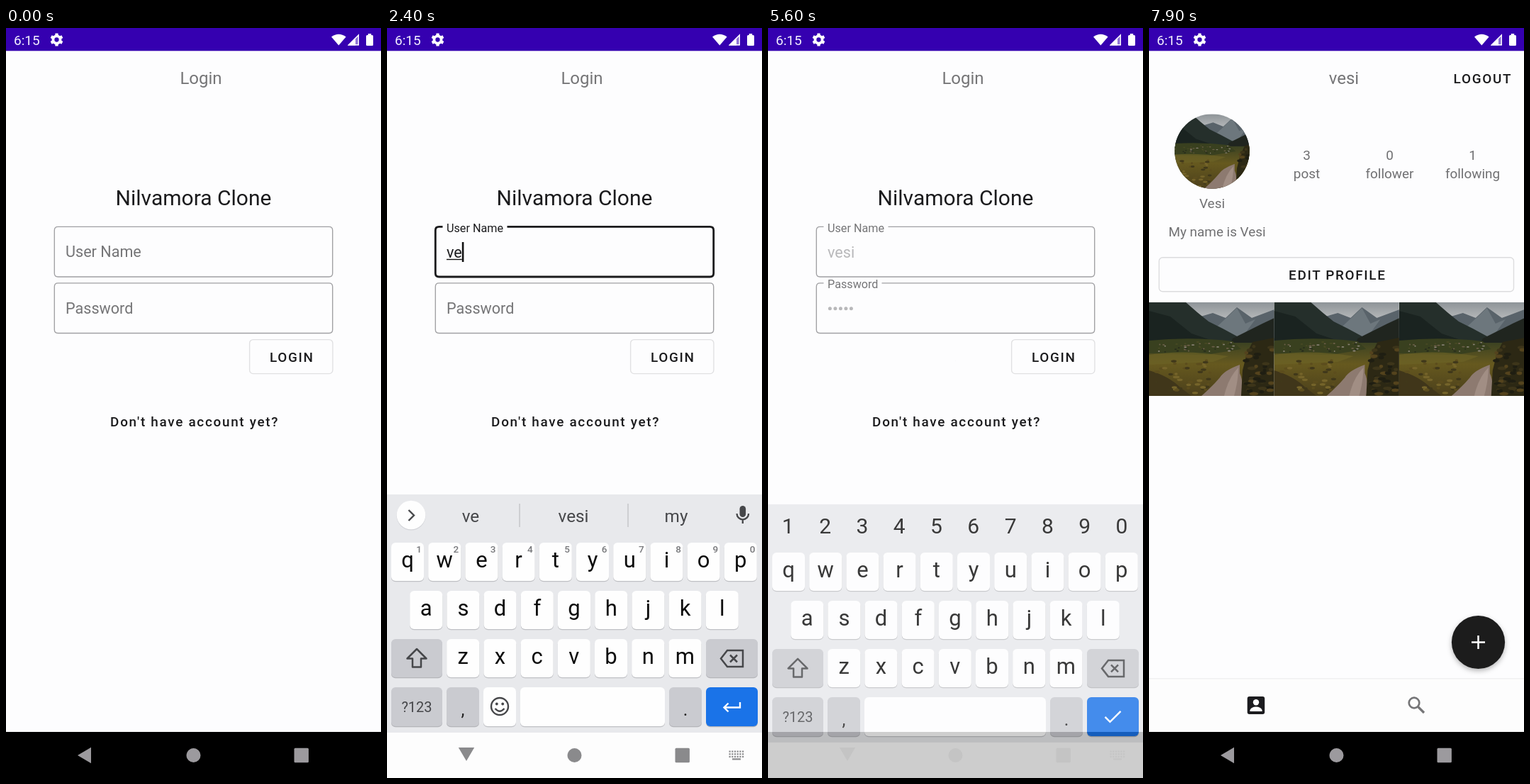
An HTML page that plays this animation: 529 px wide and 1058 px high, repeating every 8 s.

```html
<!DOCTYPE html>
<html lang="en">
<head>
<meta charset="utf-8">
<title>Login flow</title>
<style>
html, body { margin: 0; width: 100%; height: 100%; overflow: hidden; background: #fdfdfe; }
svg { display: block; width: 100%; height: 100%; }
text { font-family: Roboto, "Noto Sans", sans-serif; }
.btn { font-size: 18.9px; font-weight: 500; letter-spacing: 1.69px; fill: #1b1b1d; }
.body { font-size: 18.9px; fill: #707072; }
.title { font-size: 24px; fill: #757577; }
.field { font-size: 21.6px; }
.key { font-size: 31px; fill: #0c0c0c; }
.hint { font-size: 13.5px; font-weight: 500; fill: #77787b; }
.word { font-size: 24.3px; fill: #46474a; }
.mid { text-anchor: middle; }
</style>
</head>
<body>
<svg id="stage" viewBox="0 0 529 1058"></svg>
<script>
const LOOP = 8000;
const NAME = 'vesi', FULL = 'Vesi';
const NAME_KEYS = [2200, 2300, 2700, 2900];
const PASS_KEYS = [4300, 4550, 4800, 5050, 5300];
const T = {
  user: 1250, kbIn: 1400, pass: 3500, submit: 5560,
  profile: 6600, refresh: 7024, loaded: 7500, photos: 7550
};

const clamp = v => Math.max(0, Math.min(1, v));
const part = (t, start, dur) => clamp((t - start) / dur);
const mix = (a, b, p) => a + (b - a) * p;
const rep = (n, fn) => Array.from({ length: n }, (_, i) => fn(i)).join('');

// Markup helpers
const rect = (x, y, w, h, fill, r = 0, more = '') =>
  `<rect x="${x}" y="${y}" width="${w}" height="${h}" rx="${r}" fill="${fill}" ${more}/>`;
const circle = (x, y, r, fill, more = '') =>
  `<circle cx="${x}" cy="${y}" r="${r}" fill="${fill}" ${more}/>`;
const path = (d, fill, more = '') => `<path d="${d}" fill="${fill}" ${more}/>`;
const line = (d, color, w, more = '') =>
  path(d, 'none', `stroke="${color}" stroke-width="${w}" ${more}`);
const text = (x, y, s, cls, more = '') => `<text x="${x}" y="${y}" class="${cls}" ${more}>${s}</text>`;
const group = (id, inner, more = '') => `<g id="${id}" ${more}>${inner}</g>`;
const btnText = (cx, y, s) => text(cx + .85, y, s, 'btn mid');

const gear = (x, y, r, color) =>
  `<g transform="translate(${x} ${y}) scale(${r})">` +
  circle(0, 0, .56, 'none', `stroke="${color}" stroke-width=".42"`) +
  rep(6, i => rect(-.24, -1, .48, .4, color, .06, `transform="rotate(${i * 60})"`)) + '</g>';

const mic = (color) =>
  rect(497.5, 674, 8.6, 16, color, 4.3) +
  line('M493.5 685a8.3 8.3 0 0 0 16.6 0M501.8 693v6', color, 2.3);

// Flat landscape in a 176.4 x 132 box
function photo() {
  let seed = 7;
  const rnd = () => (seed = seed * 16807 % 2147483647) / 2147483647;
  const specks = (n, x, y, w, h, r, colors) => rep(n, i =>
    `<ellipse cx="${(x + rnd() * w).toFixed(1)}" cy="${(y + rnd() * h).toFixed(1)}" ` +
    `rx="${(r * (.6 + rnd())).toFixed(1)}" ry="${(r * .6).toFixed(1)}" fill="${colors[i % colors.length]}"/>`);
  return rect(0, 0, 176.4, 132, 'url(#sky)') +
    path('M66 22L90 15 108 22 124 7 145 22 177 10V62H60z', '#59636a') +
    path('M92 38L124 8 136 30 150 24 128 54H100z', '#6d777d') +
    path('M0 0H52L68 14 84 27 104 37 128 50V64H0z', '#252f2b') +
    path('M0 12L30 20 60 44 90 54H0z', '#1a2320') +
    path('M177 22L160 30 140 40 118 51 112 66H177z', '#20251f') +
    rect(0, 57, 176.4, 75, 'url(#grass)') +
    path('M0 54Q60 48 118 55L130 66 80 74 0 72z', '#39401f') +
    specks(44, 14, 56, 112, 14, 1.5, ['#8b8478', '#262b1b', '#6d5f49', '#494a24']) +
    path('M0 74Q50 66 112 76L90 84 0 88z', '#6d6325', 'opacity=".7"') +
    path('M128 88Q106 96 100 106 90 118 74 132H130Q134 112 128 100z', '#8d7a70') +
    path('M126 92Q112 106 106 132H120Q126 110 126 92z', '#a18e84') +
    path('M177 50L146 56 138 72 132 96 130 132H177z', '#2c2814') +
    path('M0 96Q28 104 44 120L60 132H0z', '#40361a') +
    specks(40, 136, 62, 38, 68, 4, ['#3d351a', '#1f1e12', '#54431d']) +
    specks(40, 0, 82, 88, 48, 3, ['#5c4d1d', '#40381a', '#75642a']);
}

function fieldMarkup(id, label, dy) {
  return line('', '#a0a0a3', 1.35, `id="${id}Box"`) +
    text(84, 323 + dy, label, 'field', `id="${id}Label"`) +
    text(84, 324 + dy, '', 'field', `id="${id}Value"`) +
    rect(84, 302 + dy, 2.6, 28, '#111', 0, `id="${id}Cursor"`);
}

function key(x, y, w, label, h = 54) {
  return rect(x, y + 1.3, w, h, '#bfc0c4', 6) + rect(x, y, w, h, '#fefefe', 6) +
    text(x + w / 2, y + 35, label, 'key mid');
}
const modKey = (x, y, w, fill = '#cacbd0', h = 54) =>
  rect(x, y + 1.3, w, h, '#b4b5b9', 6) + rect(x, y, w, h, fill, 6);

function keyboardMarkup() {
  const row = (letters, x, y) => rep(letters.length, i => key(x + 52.2 * i, y, 46, letters[i]));
  const ink = '#46474a', soft = '#77787b';
  const space = (x) => key(x, 930, 392 - x, '', 55);
  const sep = x => line(`M${x} 671V704`, '#c3c4c8', 1.4);
  const chevron = d => circle(34, 688, 20.5, '#d3d4d8') + circle(34, 687, 20.3, '#fefefe') +
    line(d, ink, 2.4);
  const toolbar = chevron('M38 680l-7.5 7.5 7.5 7.5') +
    line('M94 677h18v14l-6 6H94zM112 690h-7v7M98 688q4 5 9 1', soft, 2.4, 'stroke-linejoin="round"') +
    circle(99, 683, 1.6, soft) + circle(107, 683, 1.6, soft) +
    text(178.5, 693.5, 'GIF', 'mid', `font-size="18" font-weight="900" letter-spacing="1" fill="${soft}"`) +
    line('M246.500 677h19v21h-19zM250.500 684h11M250.500 689h11M250.500 694h7', soft, 2.3) +
    rect(251, 674, 10, 6, soft, 2) +
    gear(332, 688, 12, soft) + sep(378) + rep(3, i => circle(417.500 + i * 8.5, 687, 2.8, soft)) + mic(soft);
  const words = chevron('M30.500 680l7.500 7.500-7.500 7.500') + sep(187) + sep(340) +
    text(118, 697, '', 'word mid', 'id="prefix"') + text(263, 697, NAME, 'word mid') +
    text(408, 697, 'my', 'word mid') + mic(ink);
  const plain = rep(10, i => text(136 * 0 + 36 + 50, 0, '', 'hint')) && '';
  return rect(0, 658, 529, 400, '#e8e9ec') + rect(0, 994, 529, 64, '#fdfdfd') +
    row('qwertyuiop', 6, 726) + row('asdfghjkl', 32.2, 794) + row('zxcvbnm', 84.2, 862) +
    modKey(6, 862, 72) + line('M42 876L28.500 889.500h7.500v12h12v-12h7.500z', ink, 2.5, 'stroke-linejoin="round"') +
    modKey(450, 862, 73) + line('M480 878h22v23h-22l-9-11.500zM484 884.500l10 10M494 884.500l-10 10', ink, 2.5) +
    modKey(6, 930, 72, '#cacbd0', 55) + text(42, 965, '?123', 'mid', `font-size="20" fill="${ink}"`) +
    modKey(84, 930, 46, '#cacbd0', 55) + text(107, 970, ',', 'mid', 'font-size="25" fill="#222"') +
    modKey(398, 930, 46, '#cacbd0', 55) + text(421, 970, '.', 'mid', 'font-size="25" fill="#222"') +
    modKey(450, 930, 73, '#1a73e8', 55) + plain +
    group('textKeys',
      rep(10, i => text(45 + 52.3 * i, 740, (i + 1) % 10, 'hint mid')) +
      key(136, 930, 46, '', 55) + space(188) +
      circle(159, 957, 12, 'none', `stroke="${ink}" stroke-width="2.4"`) +
      circle(154.800, 953.500, 1.9, ink) + circle(163.200, 953.500, 1.9, ink) +
      line('M152.500 960q6.500 7.500 13 0', ink, 2.3) +
      line('M498 951v7.500h-22M481.500 952.500l-6 6 6 6', '#fff', 2.4) +
      group('toolbar', toolbar) + group('words', words)) +
    group('passKeys',
      rep(10, i => text(28.3 + 52.3 * i, 699, (i + 1) % 10, 'key mid', 'style="font-size:30px"')) +
      space(136) + line('M475.500 958l7 7 15-15', '#fff', 2.4));
}

const stops = (...list) => list.map(([o, c]) => `<stop offset="${o}" stop-color="${c}"/>`).join('');
const stats = [[222.5, 3, 'post'], [339.5, 0, 'follower'], [456.5, 1, 'following']];

document.getElementById('stage').innerHTML =
  `<defs>
    <linearGradient id="sky" x2="0" y2="1">${stops([0, '#8e9498'], [.15, '#b0b3b5'], [.4, '#737c82'])}</linearGradient>
    <linearGradient id="grass" x2="0" y2="1">${stops([0, '#3c4222'], [.4, '#66591f'], [1, '#4b3f1b'])}</linearGradient>
    <linearGradient id="shine" gradientUnits="userSpaceOnUse" x1="-132" x2="132" y1="0" y2="0">
      ${stops([0, '#f1f1f1'], [.5, '#d7d7d8'], [1, '#f1f1f1'])}</linearGradient>
    <filter id="shadow" x="-40%" y="-40%" width="180%" height="180%">
      <feDropShadow dx="0" dy="3" stdDeviation="3.5" flood-opacity=".28"/></filter>
    <clipPath id="face"><circle cx="89" cy="174" r="52.700"/></clipPath>
    <clipPath id="frame"><rect width="176.400" height="132"/></clipPath>
    <g id="photo" clip-path="url(#frame)">${photo()}</g>
  </defs>` +
  rect(0, 0, 529, 1058, '#fdfdfe') +
  group('login',
    text(275, 79, 'Login', 'title mid') +
    text(264.5, 250, 'Nilvamora Clone', 'mid', 'font-size="30" fill="#1b1b1d"') +
    fieldMarkup('user', 'User Name', 0) + line('', '#111', 1.4, 'id="compose"') +
    fieldMarkup('pass', 'Password', 79.5) + group('bullets', '') +
    rect(343.6, 439.600, 117.300, 48, 'none', 5, 'stroke="#e0e0e2" stroke-width="1.35"') +
    btnText(402.5, 470.500, 'LOGIN') + btnText(265.3, 562, "Don't have account yet?") +
    group('dots', rep(12, i => {
      const a = i * Math.PI / 6;
      return circle(264.5 + 43.7 * Math.sin(a), 513 - 43.7 * Math.cos(a), 0, '#1b1b1d');
    }))) +
  group('profile',
    text(275, 79, NAME, 'title mid') + btnText(470, 77.500, 'LOGOUT') +
    group('skeleton',
      circle(89, 174, 52.7, 'url(#shine)') + rect(164, 164.500, 351, 52, 'url(#shine)') +
      rect(13.500, 233.500, 150.500, 26, 'url(#shine)') + rect(27, 273, 474, 35.500, 'url(#shine)') +
      rect(13.500, 323, 501.500, 50, 'url(#shine)', 3)) +
    group('details',
      stats.map(([x, n, s]) => text(x, 185.5, n, 'body mid') + text(x, 211.5, s, 'body mid')).join('') +
      text(89, 254, FULL, 'body mid') + text(27.5, 294, 'My name is ' + FULL, 'body') +
      rect(14.200, 323.700, 500.300, 48, 'none', 5, 'stroke="#dcdcde" stroke-width="1.35"') +
      btnText(265, 355, 'EDIT PROFILE') +
      group('photos',
        `<g clip-path="url(#face)"><use href="#photo" transform="translate(18.400 121.300) scale(.8)"/></g>` +
        rep(3, i => `<use href="#photo" x="${i * 176.4}" y="387"/>`))) +
    rect(0, 918, 529, 76, '#fdfdfd') + line('M0 917.700H529', '#f0f0f1', 1.4) +
    rect(138.700, 943, 24.500, 25, '#1c1c1f', 3) + circle(151, 951.300, 4.2, '#fff') +
    path('M142.500 964v-2q2-4.500 8.500-4.500t8.500 4.500v2z', '#fff') +
    circle(374, 952, 7.3, 'none', 'stroke="#757577" stroke-width="2.700"') +
    line('M379 957l9 9', '#757577', 3.2) +
    group('fab', circle(0, 0, 37.6, '#1e1e1f', 'filter="url(#shadow)"') +
      line('M-9.500 0H9.500M0-9.500V9.500', '#fff', 2.5)) +
    group('refresh', circle(0, 0, 27.3, '#fbfbfb', 'filter="url(#shadow)"') +
      line('', '#111', 3.6, 'id="arc"'))) +
  rect(0, 993, 529, 65, '#000') + group('kb', keyboardMarkup()) +
  group('nav',
    path('M101 1026L120 1014.800V1037.200z', 'currentColor', 'id="back"') +
    path('M100.800 1015H123.200L112 1034z', 'currentColor', 'id="down"') +
    circle(264.5, 1026, 10, 'currentColor') + rect(406.500, 1015.800, 20.400, 20.400, 'currentColor', 1.5) +
    group('ime', rep(18, i => rect(482.5 + (i % 6) * 3.7, 1019.5 + Math.floor(i / 6) * 3.7, 2.2, 2.2, 'currentColor')) +
      rect(487, 1030.300, 12, 2.2, 'currentColor'))) +
  rect(0, 0, 529, 32.300, '#3500b0') +
  text(11, 23.5, '6:15', '', 'font-size="19" fill="#f4f0ff"') + gear(71.5, 16.5, 9, '#fff') +
  path('M459 12.500Q469.300 5 479.600 12.500L469.300 24.500z', '#fff') +
  path('M482 24.500L498 8.500V24.500z', '#8f74d6') + path('M482 24.500L493 13.500V24.500z', '#fff') +
  line('M483.500 23.800H497.300V10z', '#fff', 1.4) +
  rect(508, 10, 10, 15, '#fff', 1.5) + rect(510.800, 8, 4.400, 3, '#fff');

const el = {};
document.querySelectorAll('[id]').forEach(n => el[n.id] = n);
const set = (id, attrs) => { for (const k in attrs) el[id].setAttribute(k, attrs[k]); };
const show = (id, on) => { el[id].style.display = on ? '' : 'none'; };
const say = (id, s) => { if (el[id].textContent !== s) el[id].textContent = s; };

function drawField(id, dy, labelW, t, focusAt, blurAt, lastKey, endX) {
  const focused = t >= focusAt && t < blurAt;
  const p = 1 - (1 - part(t, focusAt, 167)) ** 2;
  const l = 68.3, r = 460.7, y = 280.4 + dy, b = 351 + dy, c = 5;
  const gap = 5.5 + labelW / 2, mid = 84 + labelW / 2;
  const from = mix(mid, mid - gap, p), to = mix(mid, mid + gap, p);
  set(id + 'Box', {
    d: `M${to} ${y}H${r - c}q${c} 0 ${c} ${c}V${b - c}q0 ${c} ${-c} ${c}H${l + c}q${-c} 0 ${-c} ${-c}V${y + c}q0 ${-c} ${c} ${-c}H${from}`,
    stroke: focused ? '#1b1b1d' : '#a0a0a3', 'stroke-width': focused ? 2.8 : 1.35
  });
  set(id + 'Label', { y: mix(323, 287.8, p) + dy, fill: focused ? '#1b1b1d' : '#757577' });
  el[id + 'Label'].style.fontSize = mix(21.6, 16.2, p) + 'px';
  set(id + 'Value', { fill: t < T.submit ? '#1b1b1d' : '#b8b8ba' });
  set(id + 'Cursor', { x: endX });
  show(id + 'Cursor', focused && (t - lastKey) % 1000 < 500);
}

function drawLogin(t) {
  const typed = NAME_KEYS.filter(k => t >= k);
  say('userValue', NAME.slice(0, typed.length));
  const width = typed.length ? el.userValue.getComputedTextLength() : 0;
  drawField('user', 0, 80, t, T.user, T.pass, typed.at(-1) || T.user, 84 + width);
  set('compose', { d: `M84 326.500h${width}` });
  show('compose', width && t < T.pass);
  say('prefix', NAME.slice(0, typed.length));
  show('toolbar', !typed.length);
  show('words', typed.length);

  const keys = PASS_KEYS.filter(k => t >= k);
  const n = keys.length, open = n && t < T.submit ? 1 : 0;
  const x = 84 + 7.5 * (n - open);
  say('passValue', open ? String(n) : '');
  set('passValue', { x });
  el.bullets.innerHTML = rep(n - open, i =>
    circle(87.4 + 7.5 * i, 395.8, 2.5, t < T.submit ? '#1b1b1d' : '#b8b8ba'));
  drawField('pass', 79.5, 71, t, T.pass, T.submit, keys.at(-1) || T.pass, x + open * 12);

  [...el.dots.children].forEach((dot, i) => {
    const age = t - T.submit - i * 100;
    dot.setAttribute('r', age < 0 ? 0 : 7.5 * Math.sin(Math.PI * age / 1200) ** 2);
  });
}

function drawKeyboard(t) {
  const hide = part(t, T.submit, 220);
  const up = t >= T.kbIn && hide < 1;
  const alpha = Math.min(part(t, T.kbIn, 180), 1 - hide);
  const drop = 400 * ((1 - part(t, T.kbIn, 350)) ** 2.54 + hide ** 2);
  show('kb', up);
  set('kb', { transform: `translate(0 ${drop})`, opacity: alpha });
  show('textKeys', t < T.pass);
  show('passKeys', t >= T.pass);
  show('back', !up);
  show('down', up);
  set('ime', { opacity: up ? alpha : 0 });
  el.nav.style.color = !up ? '#9c9a9e' : alpha < 1 ? '#c4c4c4' : '#8a8a8c';
}

function drawProfile(t) {
  show('skeleton', t < T.loaded);
  show('details', t >= T.loaded);
  const shift = -264.5 + 1.058 * ((t - T.profile) % 1000);
  set('shine', { gradientTransform: `translate(${shift} 250) rotate(22)` });
  set('photos', { opacity: part(t, T.photos, 200) });

  const grow = part(t, T.loaded, 200);
  set('fab', { transform: `translate(464.500 866.500) scale(${1 - (1 - grow) ** 2})` });
  show('fab', grow > 0);

  const fall = 1 - (1 - part(t, T.refresh, 200)) ** 2;
  const scale = 1 - part(t, T.loaded, 150);
  show('refresh', t >= T.refresh && scale > 0);
  set('refresh', { transform: `translate(264.500 ${mix(5, 145, fall)}) scale(${scale})` });
  const age = t - T.refresh, q = part(age, 60, 640);
  const a = (6 + age * .05) * Math.PI / 180;
  const e = a + (22 + 265 * q * q * (3 - 2 * q)) * Math.PI / 180;
  const at = v => `${11.3 * Math.cos(v)} ${11.3 * Math.sin(v)}`;
  set('arc', { d: `M${at(a)}A11.300 11.300 0 ${e - a > Math.PI ? 1 : 0} 1 ${at(e)}` });
}

function frame() {
  const t = performance.now() % LOOP;
  const inProfile = t >= T.profile;
  show('login', !inProfile);
  show('profile', inProfile);
  if (inProfile) drawProfile(t); else drawLogin(t);
  drawKeyboard(t);
  requestAnimationFrame(frame);
}
frame();
</script>
</body>
</html>
```
